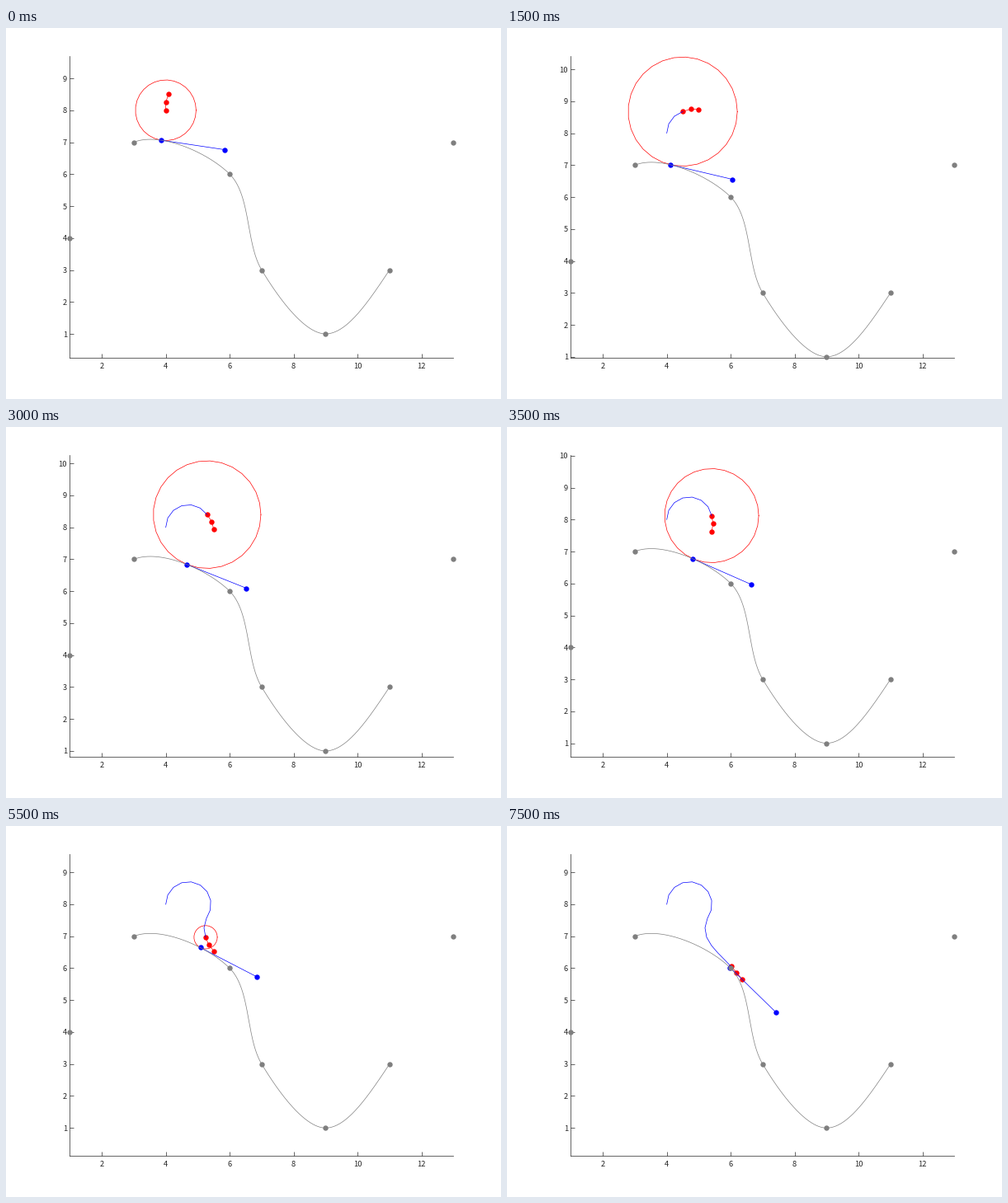
These frames come from a looping animation (600 px wide and 450 px high, 8000 ms). A matplotlib script:

```python
import numpy as np
import matplotlib.pyplot as plt
from matplotlib.animation import FuncAnimation
from matplotlib.ticker import MultipleLocator

FRAMES = 16
SUBSTEPS = 30                   # control updates per frame
STEP = 0.3 / SUBSTEPS
WHEELBASE = 0.2575
MAX_STEER = np.radians(20)
K_HEADING, K_OFFSET = 3.0, 5.0
LOOK = 2.0                      # length of the tangent arrow
GRAY, DARK = "#7f7f7f", "#262626"

knots = np.array([[1, 4], [3, 7], [6, 6], [7, 3], [9, 1], [11, 3], [13, 7]], float)


def catmull_rom(pts, n):
    """Points and unit tangents of the spline through the inner knots."""
    t = np.linspace(0, 1, n)[:, None]
    pos, tan = [], []
    for a, b, c, d in zip(pts, pts[1:], pts[2:], pts[3:]):
        m0, m1 = (c - a) / 2, (d - b) / 2
        q2 = 3 * (c - b) - 2 * m0 - m1
        q3 = 2 * (b - c) + m0 + m1
        pos.append(b + m0 * t + q2 * t**2 + q3 * t**3)
        tan.append(m0 + 2 * q2 * t + 3 * q3 * t**2)
    pos, tan = np.vstack(pos), np.vstack(tan)
    return pos, tan / np.linalg.norm(tan, axis=1)[:, None]


def unit(angle):
    return np.array([np.cos(angle), np.sin(angle)])


path, tangents = catmull_rom(knots, 800)


def drive():
    """Bicycle model steering itself onto the path."""
    pos, heading = np.array([4.0, 8.0]), np.pi / 2
    states = []
    for k in range(FRAMES * SUBSTEPS):
        i = np.argmin(np.sum((path - pos) ** 2, axis=1))
        near, tan = path[i], tangents[i]
        gap = pos - near
        offset = tan[0] * gap[1] - tan[1] * gap[0]
        error = np.arctan2(tan[1], tan[0]) - heading
        error = (error + np.pi) % (2 * np.pi) - np.pi
        steer = np.clip(K_HEADING * error - K_OFFSET * offset, -MAX_STEER, MAX_STEER)
        if k % SUBSTEPS == 0:
            front = pos + WHEELBASE * unit(heading)
            tip = front + WHEELBASE * unit(heading + steer)
            states.append((np.array([pos, front, tip]),
                           np.array([near, near + LOOK * tan]), abs(offset)))
        turn = STEP / WHEELBASE * np.tan(steer)
        pos = pos + STEP * unit(heading + turn / 2)
        heading += turn
    return states


states = drive()
trail = np.array([s[0][0] for s in states])
ring = unit(np.linspace(0, 2 * np.pi, 30)).T

plt.rcParams["font.family"] = ["Noto Sans CJK JP", "Liberation Sans"]
fig = plt.figure(figsize=(6, 4.5), dpi=100, facecolor="white")
ax = fig.add_axes([77.4 / 600, 49.6 / 450, 465 / 600, 366.75 / 450])
ax.set_xlim(1, 13)
ax.spines[["top", "right"]].set_visible(False)
ax.xaxis.set_major_locator(MultipleLocator(2))
ax.yaxis.set_major_locator(MultipleLocator(1))
ax.tick_params(direction="in", length=3.35, width=0.5, color=DARK,
               labelcolor=DARK, labelsize=6.7)
ax.tick_params(axis="y", pad=2.5)
ax.tick_params(axis="x", pad=4.2)
for side in ("left", "bottom"):
    ax.spines[side].set(linewidth=0.5, color=DARK)


def line(color, z, style="-", xy=((), ())):
    return ax.plot(*xy, style, color=color, lw=0.5, ms=4.6, mew=0,
                   zorder=z, clip_on=False)[0]


circle = line("red", 3)
chain = line("red", 3.1, "o-")
trace = line("blue", 4)
arrow = line("blue", 4.1, "o-")
line(GRAY, 5, xy=path.T)
line(GRAY, 5.1, "o", knots.T)

half = 6 * 366.75 / 465         # equal scale on both axes


def draw(k):
    body, target, radius = states[k]
    rim = body[0] + radius * ring
    circle.set_data(*rim.T)
    chain.set_data(*body.T)
    arrow.set_data(*target.T)
    trace.set_data(*trail[:k + 1].T)
    top = max(rim[:, 1].max(), trail[:k + 1, 1].max(), body[:, 1].max())
    mid = (1 + top) / 2
    ax.set_ylim(mid - half, mid + half)
    return circle, chain, arrow, trace


anim = FuncAnimation(fig, draw, frames=FRAMES, interval=500,
                     repeat=True, repeat_delay=0, blit=False)
plt.show()
```
